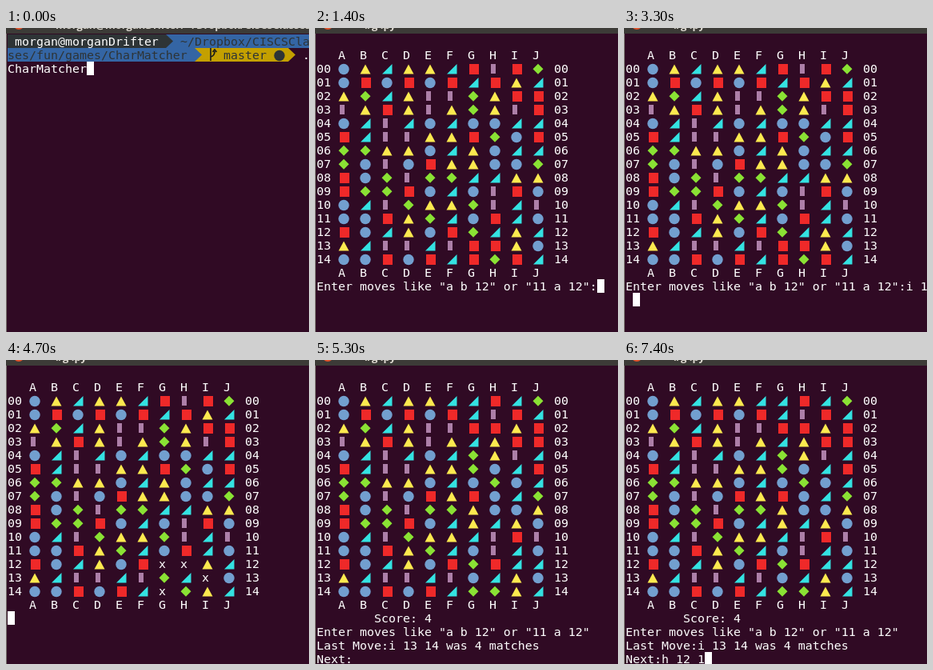
Recreate the animation shown at these times as an HTML page. Size 379x380 px, loop 8 s.

```html
<!DOCTYPE html>
<html lang="en">
<head>
<meta charset="utf-8">
<title>Matching game in a terminal</title>
<style>
  html, body { margin: 0; width: 100%; height: 100%; overflow: hidden; background: #300a24; }
  svg { display: block; width: 379px; height: 380px; }
  text { font: 14.95px "DejaVu Sans Mono", monospace; fill: #fff; white-space: pre; }
  .dark { fill: #2e3436; }
  .title { font: bold 13px "Open Sans", sans-serif; fill: #dfdbd2; }
</style>
</head>
<body>
<svg id="stage" viewBox="0 0 379 380"></svg>
<script>
const LOOP = 8000, COLS = 43, CELL = 9, LINE = 17;
const DARK = '#2e3436', BLUE = '#3465a4', GOLD = '#c4a000';
const stage = document.getElementById('stage');

const START = [
  'ctwttwsbsd', 'cscscswstw', 'tdwtbbdtss', 'btstbtdtbs', 'cwbwcwccww',
  'swbbttsdcs', 'ddttcwtcww', 'dcbcsttccd', 'scdbddwwtt', 'sddscwcbsc',
  'cwbdttdbwb', 'ccstdwcswc', 'scwtcsdwtw', 'twbbwbsstc', 'ccscswsdsw'
];
const HINT = 'Enter moves like "a b 12" or "11 a 12"';

// [time, typed text, cursor visible]
const FIRST_MOVE = [
  [200, '', 1], [800, '', 0], [1400, '', 1], [2000, '', 0], [2100, 'i ', 1],
  [3300, 'i 13 ', 1], [3400, 'i 13 1', 1], [4000, 'i 13 1', 0], [4100, 'i 13 14', 1]
];
const NEXT_MOVE = [
  [5300, '', 0], [5900, '', 1], [6500, '', 0], [6600, 'h ', 1], [6900, 'h 1', 1],
  [7100, 'h 12', 1], [7200, 'h 12 ', 1], [7400, 'h 12 1', 1]
];

const px = col => 2 + CELL * col;
const py = row => 8 + LINE * row;
const rect = (x, y, w, h, fill) =>
  `<rect x="${x}" y="${y}" width="${w}" height="${h}" fill="${fill}"/>`;
const path = (d, fill) => `<path d="${d}" fill="${fill}"/>`;
const text = (col, row, s, cls = '') =>
  `<text x="${px(col)}" y="${py(row) + 14}" class="${cls}">${s}</text>`;
const cursor = (col, row) => rect(px(col), py(row), CELL, LINE, '#fff');
const fill = (from, to, row, color) =>
  rect(px(from), py(row), CELL * (to - from), LINE, color);
const arrow = (col, row, color) =>
  path(`M${px(col)} ${py(row)}l9 8.5l-9 8.5z`, color);
const disc = (x, y, r, color) => `<circle cx="${x}" cy="${y}" r="${r}" fill="${color}"/>`;

const PIECES = {
  c: (x, y) => disc(x + 7, y + 9.5, 6.7, '#729fcf'),
  s: (x, y) => rect(x + 2, y + 3, 12, 13, '#ef2929'),
  t: (x, y) => path(`M${x + 7} ${y + 3.5}l6.5 12h-13z`, '#fce94f'),
  d: (x, y) => path(`M${x + 7} ${y + 2.8}l6.5 6.5l-6.5 6.5l-6.5-6.5z`, '#8ae234'),
  w: (x, y) => path(`M${x + 13.5} ${y + 3}v12.5h-12.5z`, '#34e2e2'),
  b: (x, y) => rect(x + 2, y + 3, 6, 12, '#ad7fa8')
};

// Cleared cells bubble to the top one swap at a time, then get a new piece.
function collapse(steps) {
  const g = START.map(r => [...r]);
  g[14][8] = g[13][8];
  for (const [r, c] of [[13, 6], [13, 7], [13, 8], [14, 6]]) g[r][c] = 'x';
  const rise = (bottom, cols, fresh) => {
    for (let r = bottom; r >= 0; r--) {
      cols.forEach((c, i) => {
        if (steps-- <= 0) return;
        if (r) [g[r][c], g[r - 1][c]] = [g[r - 1][c], g[r][c]];
        else g[0][c] = fresh[i];
      });
    }
  };
  rise(13, [6, 7, 8], 'wsw');
  rise(14, [6], 'w');
  return g;
}

function board(grid) {
  const heads = [...'ABCDEFGHIJ'].map((c, i) => text(3 + 3 * i, 1, c) + text(3 + 3 * i, 17, c));
  const rows = grid.map((cells, r) => {
    const label = String(r).padStart(2, '0');
    const row = r + 2;
    return text(0, row, label) + text(33, row, label) + [...cells].map((p, i) => {
      const col = 3 + 3 * i;
      return p === 'x' ? text(col, row, p) : PIECES[p](px(col), py(row));
    }).join('');
  });
  return heads.join('') + rows.join('');
}

function frame(title) {
  return rect(0, 0, 379, 380, '#300a24') + rect(0, 0, 379, 7, '#3c3b37') +
    rect(0, 7, 1, 373, '#77716c') + disc(16, -5, 7, '#e2532b') +
    `<text class="title" x="62" y="1">${title}</text>`;
}

function shell() {
  const x = px(28), y = py(1);
  return fill(0, 22, 0, DARK) + fill(22, 42, 0, BLUE) + arrow(22, 0, DARK) +
    text(1, 0, 'morgan@morganDrifter') + text(24, 0, '~/Dropbox/CISCSCla', 'dark') +
    fill(0, 26, 1, BLUE) + fill(26, 39, 1, GOLD) + arrow(26, 1, BLUE) + arrow(39, 1, GOLD) +
    text(0, 1, 'ses/fun/games/CharMatcher', 'dark') + text(30, 1, 'master', 'dark') +
    `<path d="M${x + 2} ${y}v16M${x + 2} ${y + 11}q5-1 5-7M${x + 4.5} ${y + 5}l2.5-3l2.5 3" fill="none" stroke="#171a1b" stroke-width="1.6"/>` +
    disc(342, 34.5, 6.7, DARK) + text(41, 1, '.') + text(0, 2, 'CharMatcher') + cursor(11, 2);
}

function typing(events, t, prompt, row) {
  const [, typed, on] = events.findLast(e => t >= e[0]);
  const line = prompt + typed;
  const wraps = Math.floor(line.length / COLS);
  let out = text(0, row, line.slice(0, COLS)) + text(0, row + 1, line.slice(COLS));
  if (on) out += cursor(line.length % COLS, row + wraps);
  return out;
}

function scene(t) {
  if (t < 200) return frame('morgan@morganDrifter: ~/Dropbox/CISCSClasses') + shell();
  const base = frame('./g .py');
  if (t < 4700) return base + board(START) + typing(FIRST_MOVE, t, HINT + ':', 18);
  if (t < 5300) {
    const tick = Math.floor((t - 4700) / 100);
    return base + board(collapse(2 + 9 * tick)) + cursor(0, 18);
  }
  return base + board(collapse(Infinity)) + text(8, 18, 'Score: 4') + text(0, 19, HINT) +
    text(0, 20, 'Last Move:i 13 14 was 4 matches') + typing(NEXT_MOVE, t, 'Next:', 21);
}

let shown = -1;
const began = performance.now();
function draw() {
  const t = Math.max(0, performance.now() - began) % LOOP;
  const tick = Math.floor(t / 100);
  if (tick !== shown) {
    shown = tick;
    stage.innerHTML = scene(tick * 100);
  }
  requestAnimationFrame(draw);
}
draw();
</script>
</body>
</html>
```
